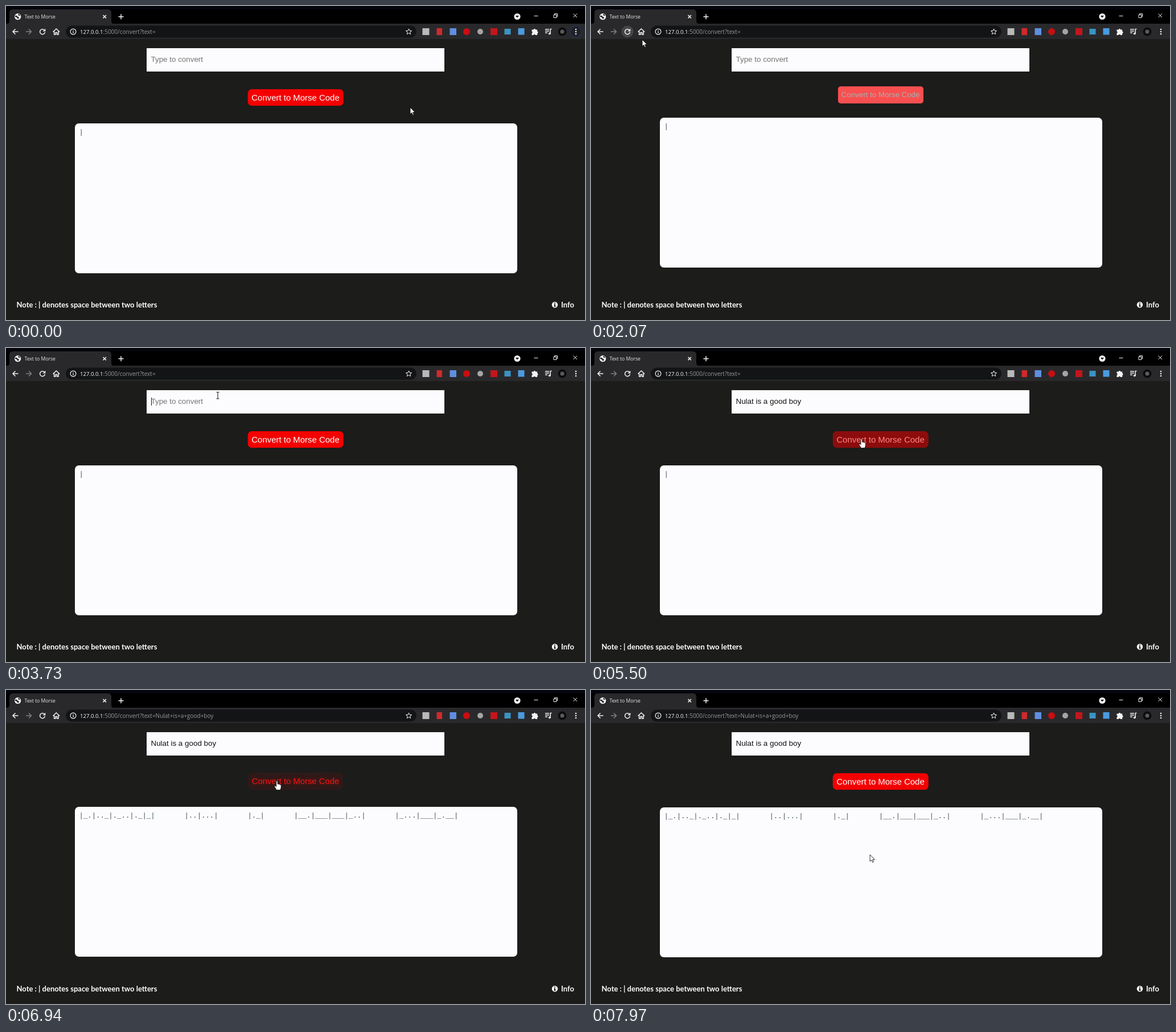
Animation of 1017x551 px, one loop 8 s. Source, as an HTML page:

```html
<!DOCTYPE html>
<html lang="en">
<head>
<meta charset="utf-8">
<title>Text to Morse</title>
<style>
  html, body { margin: 0; width: 100%; height: 100%; overflow: hidden; background: #1c1c1b; }
  #stage { position: relative; width: 1017px; height: 551px; overflow: hidden; }
  #stage > * { position: absolute; }
  svg { left: 0; top: 0; }
  #field, #convert { font-family: "Liberation Sans", Arial, sans-serif; white-space: pre; }
  #field { left: 247px; top: 74px; width: 515.5px; height: 41px; padding-left: 7.5px; background: #fcfcfe; font-size: 13.4px; line-height: 40px; color: #111; }
  #hint { color: #757575; }
  #caret { display: inline-block; width: 1px; height: 14px; margin-right: -1px; vertical-align: -3px; background: #111; }
  #convert { left: 508.5px; height: 29.8px; line-height: 30px; transform: translateX(-50%); }
  #output { left: 120.5px; width: 769px; height: 255px; padding: 8px 0 0 8px; border-radius: 7px; background: #fcfcfe; color: #48545c; font: 12.34px/17px "Liberation Mono", monospace; white-space: pre; }
  .ui { font-family: "Open Sans", sans-serif; }
  .note { font: bold 13px Lato, sans-serif; fill: #fff; }
  .line { fill: none; stroke: #f4f4f4; stroke-width: 1.5; }
</style>
</head>
<body>
<div id="stage">
  <svg width="1017" height="551">
    <rect width="1017" height="58.5" fill="#000"/>
    <rect width="1017" height="6" fill="#05060d"/>
    <path d="M0 31H1017V58.5H0ZM2 31Q6 31 6 26V12Q6 6 12 6H179Q185 6 185 12V26Q185 31 189 31Z" fill="#29292b"/>
    <rect x="105" y="34.5" width="616" height="21" rx="10.5" fill="#131416"/>

    <!-- tab strip -->
    <circle cx="20.7" cy="18.7" r="5.6" fill="#f4f4f4"/>
    <path d="M16 17q3-1 4 1t3 1l-1 4q-3-1-3-3l-3-1ZM21 14q3 0 4 3l-3 0Z" fill="#29292b"/>
    <text class="ui" x="32.5" y="21.8" font-size="8.6" fill="#e8e8e8">Text to Morse</text>
    <path class="line" d="M170.5 16l5.4 5.4m0-5.4l-5.4 5.4M197.5 18.7h9m-4.5-4.5v9"/>
    <circle cx="898" cy="18.5" r="5.6" fill="#f4f4f4"/>
    <path d="M895 17h6l-3 3.6Z" fill="#000"/>
    <path class="line" style="stroke-width:1" d="M927.5 17.5h7M962 15.500h5v5h-5ZM963.500 15.500v-2h5v5h-1.500M996.500 13.500l6.500 6.500m0-6.500l-6.500 6.500"/>

    <!-- toolbar -->
    <path class="line" d="M21.500 45h-9.500m4.500-4.500l-4.500 4.500l4.500 4.500"/>
    <path class="line" style="stroke:#808184" d="M35 45h9.500m-4.500-4.500l4.500 4.500l-4.500 4.500"/>
    <circle id="reloadGlow" cx="64" cy="45" r="10.500" fill="#4b4b4e"/>
    <path class="line" d="M67.800 42.600A4.500 4.500 0 1 0 68.500 46"/>
    <path d="M69.300 39.800v4.700h-4.700Z" fill="#f4f4f4"/>
    <path class="line" d="M82.500 45.500L88.300 40l5.800 5.500M84.600 44.500v5.500h2.500v-3.500h2.500v3.500h2.500v-5.500"/>
    <circle class="line" style="stroke-width:1.200" cx="118" cy="45" r="4.900"/>
    <path class="line" style="stroke-width:1.300" d="M118 44.300v3.500M118 42.200v1.200"/>
    <text class="ui" x="130" y="48.500" font-size="9.600" fill="#fff">127.0.0.1</text>
    <text class="ui" id="path" x="170.500" y="48.500" font-size="10" fill="#97989b"></text>
    <path class="line" style="stroke-width:1" d="M707.500 40l1.400 3.300l3.600.3l-2.700 2.400l.8 3.500l-3.100-1.900l-3.100 1.900l.8-3.500l-2.700-2.400l3.600-.3Z"/>
    <rect x="731.500" y="39" width="12" height="12" fill="#b9b9b9"/>
    <rect x="756.500" y="39" width="9.500" height="12" fill="#cf2a2c"/>
    <rect x="779.500" y="39" width="11.500" height="12" fill="#5f8fe0"/>
    <circle cx="809" cy="45" r="6" fill="#c90d12"/>
    <circle cx="833" cy="45" r="5" fill="#a5a5a5"/>
    <rect x="851" y="39" width="12" height="12" fill="#c4151c"/>
    <rect x="875.500" y="40" width="11" height="10" fill="#3b93c4"/>
    <rect x="899.500" y="39" width="11" height="11.500" fill="#4a9be0"/>
    <path d="M923.500 41.500h3.200a1.800 1.800 0 0 1 3.500 0h3v3.100a1.800 1.800 0 0 1 0 3.500v2.900h-3.300a1.700 1.700 0 0 0-3.300 0h-3.100v-3.200a1.700 1.700 0 0 0 0-3.300Z" fill="#f4f4f4"/>
    <path class="line" d="M947 41h7M947 44h7M947 47h4M956.200 48.500v-8h2.300"/>
    <circle cx="954.800" cy="48.300" r="1.900" fill="#f4f4f4"/>
    <circle cx="977" cy="45" r="7.500" fill="#0c0c0d"/>
    <circle cx="977" cy="45" r="3.500" fill="#5b5b5d"/>
    <circle id="ring" cx="1001" cy="45" r="10" fill="#202127" stroke="#243257" stroke-width="1.500"/>
    <g fill="#f4f4f4"><circle cx="1001" cy="41" r="1.300"/><circle cx="1001" cy="45" r="1.300"/><circle cx="1001" cy="49" r="1.300"/></g>

    <!-- page footer -->
    <text class="note" x="18.500" y="528.500">Note : | denotes space between two letters</text>
    <text class="note" x="998" y="528.500" text-anchor="end">Info</text>
    <circle cx="964" cy="524.300" r="5.200" fill="#fff"/>
    <path d="M963 520.500h2v1.700h-2ZM962.500 523.200h2.500v3.300h.8v1.200h-3.500v-1.200h.7v-2.100h-.5Z" fill="#1c1c1b"/>
  </svg>

  <div id="field"><span id="typed"></span><span id="caret"></span><span id="hint">Type to convert</span></div>
  <div id="convert">Convert to Morse Code</div>
  <div id="output"></div>

  <svg width="1017" height="551">
    <g id="pointer">
      <path id="arrow" d="M0 0V11.800L2.700 9.300L4.500 13.400L6.400 12.600L4.600 8.600H8.400Z" fill="#fff" stroke="#000" stroke-width=".8"/>
      <path id="beam" d="M-2.500-5.500H-.5L0-5L.5-5.500H2.500M0-5V5M-2.500 6H-.5L0 5L.5 6H2.500" fill="none" stroke="#222" stroke-width="1.100"/>
      <path id="hand" d="M-1.200 1Q-1.200-.8 0-.8T1.300 1V5.200Q2.500 4.400 3.600 5.500Q4.800 4.900 5.700 6Q7.300 5.700 7.300 7.500V11.500L5.800 15.500H-.6L-4.300 9.500Q-4.800 7.800-3 7.900L-1.200 9.500Z" fill="#fff" stroke="#000" stroke-width=".8"/>
    </g>
  </svg>
</div>
<script>
const LOOP = 8000, FADE = 400;
const RELOAD = 1912, SUBMIT = 6618;
const HOVER = 5388, REHOVER = 6680, LEAVE = 7532;
const FOCUS = 3500, TYPE = 3800, KEY = 58;
const PHRASE = "Nulat is a good boy";
const MORSE = { a: "._", b: "_...", d: "_..", g: "__.", i: "..", l: "._..", n: "_.", o: "___", s: "...", t: "_", u: ".._", y: "_.__" };

// time, x, y
const TRAIL = [
  [0, 710, 178], [430, 710, 178], [900, 620, 124], [1650, 64, 41], [1900, 64, 41],
  [2070, 90, 59], [3300, 372, 83], [4960, 372, 83], [5400, 475, 160],
  [7390, 476, 160], [7540, 427.5, 245], [7970, 490, 289], [8000, 490, 289]
];

const $ = id => document.getElementById(id);
const clamp = v => Math.min(1, Math.max(0, v));
const lerp = (a, b, k) => a + (b - a) * k;
const mix = (a, b, k) => a.map((v, i) => lerp(v, b[i], k));
const show = (id, on) => $(id).style.visibility = on ? "visible" : "hidden";
const encode = text => text.toLowerCase().split(" ")
  .map(word => "|" + [...word].map(c => MORSE[c] + "|").join("")).join(" ".repeat(7));

// CSS "ease": cubic-bezier(.25, .1, .25, 1)
function ease(x) {
  if (x <= 0 || x >= 1) return clamp(x);
  const curve = (a, b, u) => 3 * a * u * (1 - u) ** 2 + 3 * b * u * u * (1 - u) + u ** 3;
  let lo = 0, hi = 1;
  for (let i = 0; i < 20; i++) {
    const mid = (lo + hi) / 2;
    if (curve(.25, .25, mid) < x) lo = mid; else hi = mid;
  }
  return curve(.1, 1, lo);
}
const since = (t, start) => ease((t - start) / FADE);

function pointerAt(t) {
  const i = TRAIL.findIndex(p => p[0] > t);
  const [t0, ...from] = TRAIL[i - 1], [t1, ...to] = TRAIL[i];
  return mix(from, to, (1 - Math.cos(Math.PI * (t - t0) / (t1 - t0))) / 2);
}

function drawButton(t) {
  const grown = t < RELOAD ? 1 : since(t, t < SUBMIT ? RELOAD : SUBMIT);
  const hover = t < SUBMIT ? since(t, HOVER) : since(t, REHOVER) - since(t, LEAVE);
  const red = [244, 0, 0];
  const back = mix([255, 246, 248], red, grown);
  const ink = mix(mix([0, 0, 0], [255, 255, 255], grown), red, hover);
  const top = lerp(130.7, 145.6, grown);
  Object.assign($("convert").style, {
    top: top + "px",
    fontSize: lerp(9.93, 14.95, grown) + "px",
    padding: `0 ${lerp(4.4, 7.1, grown)}px`,
    borderRadius: 7 * grown + "px",
    background: `rgba(${back},${1 - hover})`,
    color: `rgb(${ink})`,
    textShadow: `0 0 7px rgba(244,0,0,${.4 * hover})`
  });
  $("output").style.top = lerp(175.7, 205.5, grown) + "px";
  return top;
}

function drawPage(t) {
  const sent = t >= SUBMIT;
  const count = Math.max(0, Math.min(PHRASE.length, Math.floor((t - TYPE) / KEY)));
  const lastKey = count ? TYPE + count * KEY : FOCUS;
  $("typed").textContent = PHRASE.slice(0, count);
  $("hint").textContent = count ? "" : "Type to convert";
  show("caret", t >= FOCUS && !sent && (t - lastKey) % 1000 < 500);
  $("path").textContent = ":5000/convert?text=" + (sent ? PHRASE.replaceAll(" ", "+") : "");
  $("output").textContent = encode(sent ? PHRASE : "");
  show("ring", t < RELOAD);
  $("reloadGlow").style.opacity = clamp((t - 1600) / 100) * clamp((2200 - t) / 150);
}

function drawPointer(t, top) {
  const [x, y] = pointerAt(t);
  const inField = x > 247 && x < 770 && y > 74 && y < 115;
  const onButton = x > 452 && x < 565 && y > top && y < top + 30;
  $("pointer").setAttribute("transform", `translate(${x} ${y})`);
  show("beam", inField);
  show("hand", onButton);
  show("arrow", !inField && !onButton);
}

const start = performance.now();
function frame() {
  const t = (performance.now() - start) % LOOP;
  drawPage(t);
  drawPointer(t, drawButton(t));
  requestAnimationFrame(frame);
}
frame();
</script>
</body>
</html>
```
